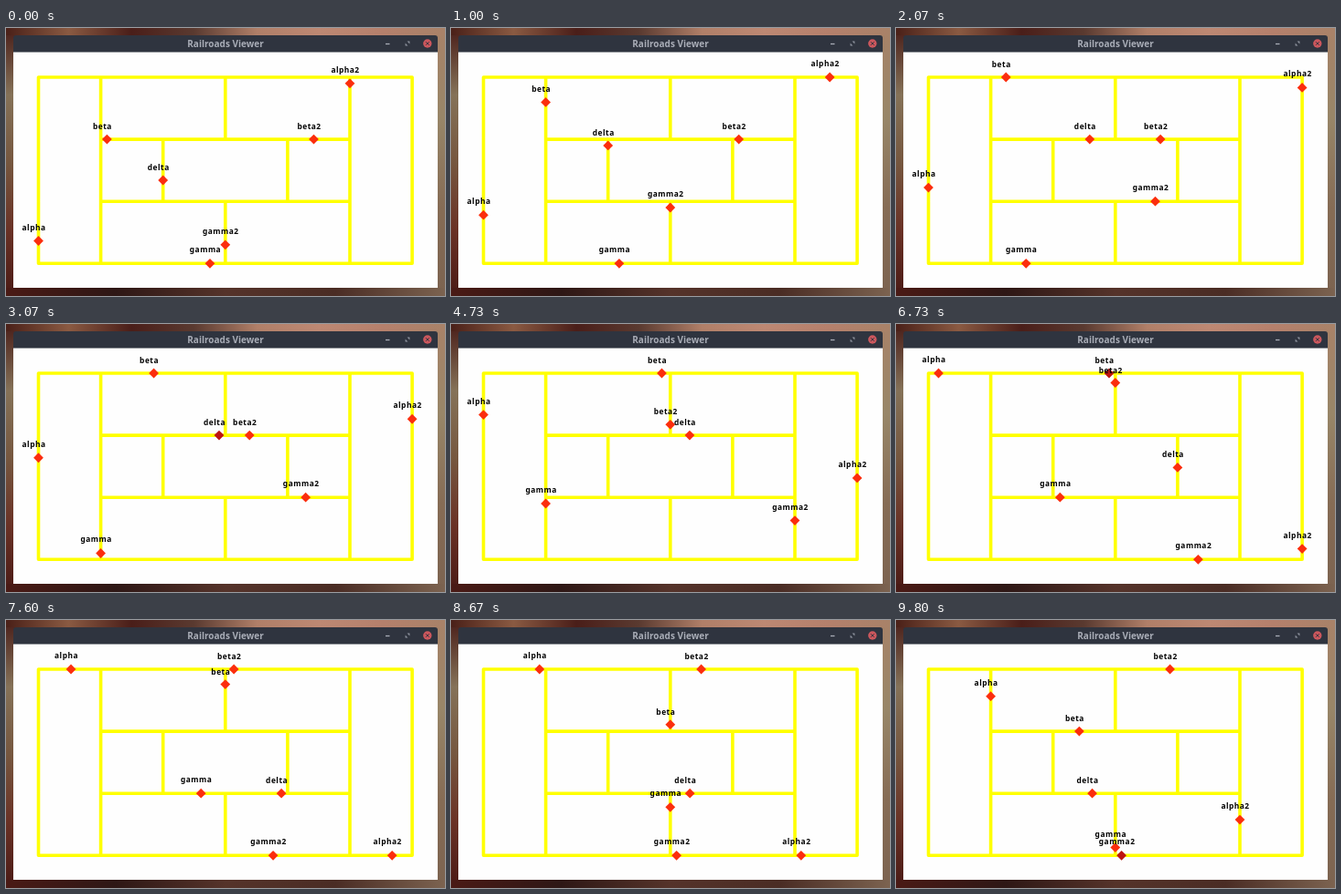
An HTML page that plays this animation: 480x294 px, repeating every 9940 ms.

```html
<!DOCTYPE html>
<html lang="en">
<head>
<meta charset="utf-8">
<title>Railroads Viewer</title>
<style>
  html, body { margin: 0; height: 100%; overflow: hidden; }
  svg {
    display: block; width: 100vw; height: 100vh;
    background:
      linear-gradient(90deg, #4a2018, #8a5a42, #4a1e19, #5a3a30, #b07f68, #bd8873, #b5806c, #a88268) top / 100% 8px no-repeat,
      linear-gradient(90deg, #4a1a15, #2e1715, #55332a, #4a2c24, #7c6350) bottom / 100% 9px no-repeat,
      linear-gradient(#4a1e19, #857258, #76573f, #6a3226, #4a1a15) left / 50% 100% no-repeat,
      linear-gradient(#a88268, #988668, #866c55, #7c6350) right / 50% 100% no-repeat;
  }
  text { text-anchor: middle; font-family: "Noto Sans", sans-serif; font-weight: 700; }
  .title { font-size: 10px; fill: #a9adb7; }
  .train text { font-size: 8.4px; letter-spacing: .5px; }
  .train path { fill: #fb2e0e; }
  .train.waiting path { fill: #bd1512; }
</style>
</head>
<body>
<svg viewBox="0 0 480 294">
  <path d="M8 27V11q0-3 3-3H469q3 0 3 3V27Z" fill="#2f343f"/>
  <text class="title" x="240" y="20.5">Railroads Viewer</text>
  <path d="M415 17.5h4.5" stroke="#a9adb7" stroke-width="1.3"/>
  <path d="M438.6 14.6h2.8v2.8ZM436.6 16.6v2.8h2.8Z" fill="#8f949f"/>
  <circle cx="460.8" cy="17" r="4.7" fill="#cc575d"/>
  <path d="M459 15.2l3.6 3.6m0-3.6l-3.6 3.6" stroke="#2f343f"/>
  <rect x="8" y="26.5" width="464" height="258.5" fill="#fefefe"/>

  <path id="rails" fill="none" stroke="#ff0" stroke-width=".053" stroke-linejoin="round"
    d="M0 0H6V3H0ZM1 0V3M5 0V3M1 1H5M1 2H5M3 0V1M3 2V3M2 1V2M4 1V2"/>
  <g id="trains"></g>
</svg>
<script>
const LOOP = 9940, FPS = 15, LAST_STEP = 147;
const LEFT = 35.5, TOP = 54, UNIT = 68.1;  // grid placement in pixels
const NODE_GAP = .1;

// Start and moves in grid units, speed in units per second; W waits in seconds.
const trains = [
  { name: "alpha", speed: .4155, x: 0, y: 2.636, moves: "U2.636 R1 D1" },
  { name: "alpha2", speed: .57, x: 5, y: .01, moves: "U.01 R1 D3 L1 U1" },
  { name: "beta", speed: .607, x: 1.01, y: 1, moves: "L.01 U1 R2 W2.24 D1 L1" },
  { name: "beta2", speed: .3365, x: 4.42, y: 1, moves: "L1.42 U1 R1" },
  { name: "delta", speed: .604, x: 2, y: 1.659, moves: "U.659 R1 W1.473 R1 D1 L2" },
  { name: "gamma", speed: .574, x: 2.753, y: 3, moves: "L1.753 U1 R2 D1" },
  { name: "gamma2", speed: .649, x: 3, y: 2.7, moves: "U.7 R2 D1 L2 W2" },
];
const directions = { L: [-1, 0], R: [1, 0], U: [0, -1], D: [0, 1] };

const isNode = (x, y) => y % 3 ? x > 0 && x < 6 : x !== 2 && x !== 4;

function locate({ x, y, speed, moves }, time) {
  let ux, uy, waiting;
  for (const move of moves.split(" ")) {
    const amount = +move.slice(1);
    waiting = move[0] === "W";
    if (waiting) {
      time -= amount;
    } else {
      [ux, uy] = directions[move[0]];
      const step = Math.min(amount, time * speed);
      x += ux * step;
      y += uy * step;
      time -= amount / speed;
    }
    if (time <= 0) break;
  }

  // Trains never stand on a node: they stop short of it, then hop across.
  const nx = Math.round(x), ny = Math.round(y);
  const past = (x - nx) * ux + (y - ny) * uy;
  const onLine = Math.abs((x - nx) * uy - (y - ny) * ux) < 1e-6;
  if (onLine && isNode(nx, ny) && Math.abs(past) < NODE_GAP) {
    const gap = past > 1e-6 ? NODE_GAP : -NODE_GAP;
    x = nx + ux * gap;
    y = ny + uy * gap;
  }
  return { x: LEFT + x * UNIT, y: TOP + y * UNIT, waiting };
}

document.getElementById("rails").setAttribute("transform", `translate(${LEFT} ${TOP}) scale(${UNIT})`);
const layer = document.getElementById("trains");
layer.innerHTML = trains.map(({ name }) => {
  const baseline = /[gp]/.test(name) ? -12 : -11;  // make room for descenders
  return `<g class="train"><path d="M0-5.4L5.4 0 0 5.4-5.4 0Z"/><text x="-5" y="${baseline}">${name}</text></g>`;
}).join("");

function draw(now) {
  const step = Math.floor((now % LOOP) * FPS / 1000 + .051);
  const time = Math.min(step, LAST_STEP) / FPS;
  trains.forEach((train, i) => {
    const { x, y, waiting } = locate(train, time);
    const el = layer.children[i];
    el.setAttribute("transform", `translate(${x} ${y})`);
    el.classList.toggle("waiting", waiting);
  });
}

const start = performance.now();
function tick() {
  draw(performance.now() - start);
  requestAnimationFrame(tick);
}
tick();
</script>
</body>
</html>
```
